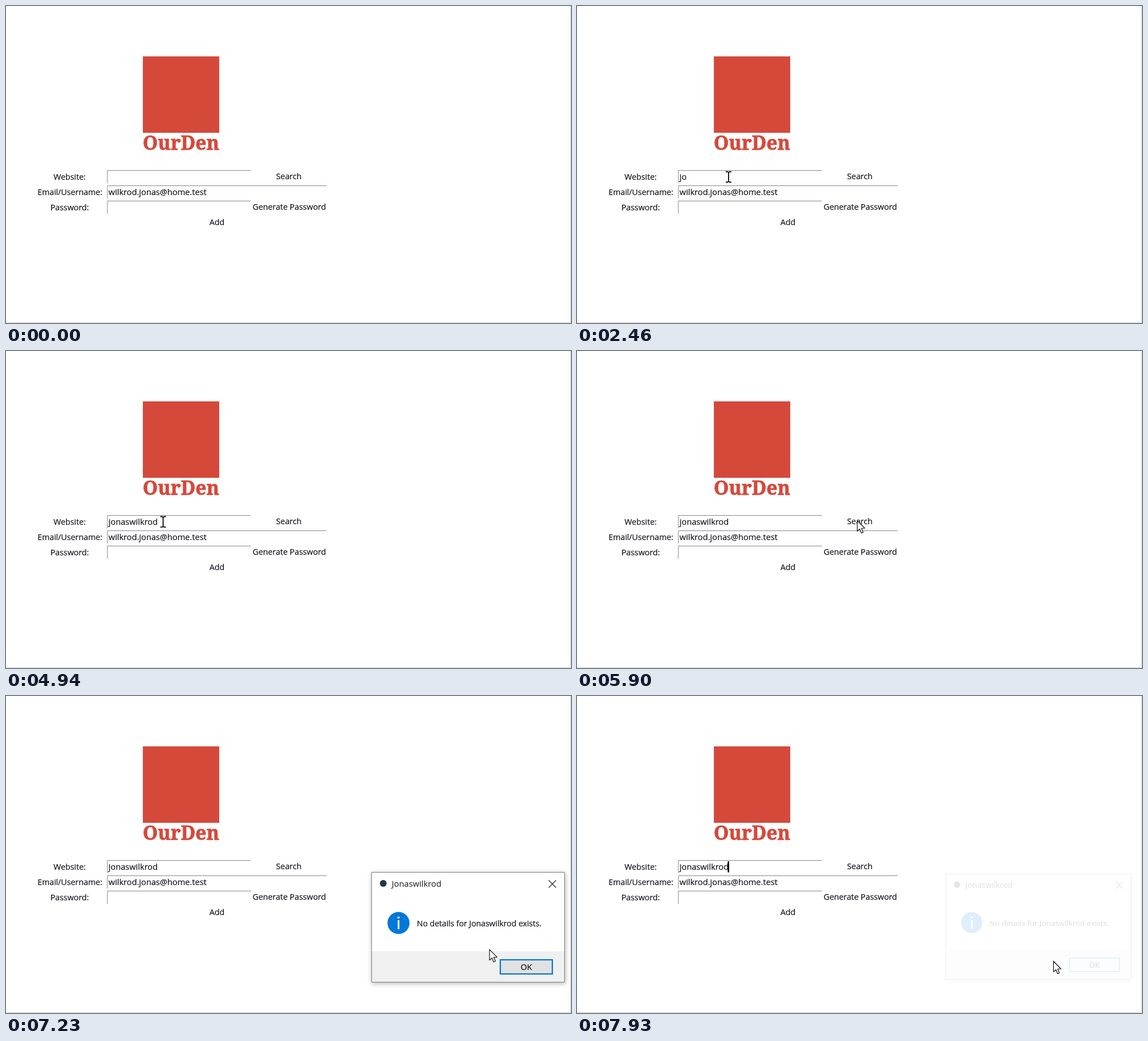
An HTML page for the animation above (8000 ms loop, 999 px wide and 560 px high).

```html
<!DOCTYPE html>
<html lang="en">
<head>
<meta charset="utf-8">
<title>Password manager</title>
<style>
  html, body { margin: 0; width: 100%; height: 100%; overflow: hidden; background: #fff; }
  svg { display: block; width: 999px; height: 560px; }
  text {
    font: 14.3px "Open Sans", "Noto Sans", sans-serif;
    fill: #14141c; stroke: #14141c; stroke-width: .2; white-space: pre;
  }
  .mid { text-anchor: middle; }
  .entry { font-size: 14.7px; }
  .brand { font: 900 34px "Noto Serif", serif; fill: #d5493b; stroke: #d5493b; stroke-width: .8; }
  .title { font-size: 14.8px; stroke: none; }
  .message { font-size: 14.1px; }
  .edge { fill: none; stroke: #868686; }
  .shadow { filter: drop-shadow(1px 2px 4px rgba(0, 0, 0, .3)); }
</style>
</head>
<body>
<svg viewBox="0 0 999 560">
  <path d="M998.5 0V559.5H0" fill="none" stroke="#cbcbcb"/>

  <rect x="242" y="89" width="135" height="135" fill="#d5493b"/>
  <text class="brand mid" x="309.5" y="254">OurDen</text>

  <text class="mid" x="112.5" y="307">Website:</text>
  <text class="mid" x="113" y="334">Email/Username:</text>
  <text class="mid" x="112.5" y="361">Password:</text>
  <text class="mid" x="500" y="306">Search</text>
  <text class="mid" x="501" y="360">Generate Password</text>
  <text class="mid" x="373" y="386.5">Add</text>

  <path class="edge" d="M179.2 313V290.5H433M179.2 340V317.5H567M179.2 367V344.5H433"/>
  <text class="entry" id="site" x="181.3" y="307.3"></text>
  <text class="entry" x="181.3" y="334.3">wilkrod.jonas@home.test</text>
  <rect id="caret" y="292" width="2.6" height="19.5" fill="#000"/>

  <g id="dialog">
    <rect class="shadow" x="646.5" y="311.5" width="341" height="194" fill="#fff" stroke="#7d7d7d"/>
    <rect x="647" y="451" width="340" height="54" fill="#f0f0f0"/>
    <circle cx="667" cy="331" r="6" fill="#22364f"/>
    <text class="title" x="682" y="337">Jonaswilkrod</text>
    <path d="M959.5 325.5l13 13m0 -13l-13 13" stroke="#222" stroke-width="1.2"/>
    <circle cx="694" cy="401" r="19.5" fill="#0078d7"/>
    <circle cx="694" cy="391.3" r="1.9" fill="#fff"/>
    <rect x="692.6" y="396" width="2.9" height="16" fill="#fff"/>
    <text class="message" x="726.5" y="407.3">No details for Jonaswilkrod exists.</text>
    <rect id="button" x="874" y="466" width="92" height="25"/>
    <text class="mid" x="920" y="484">OK</text>
  </g>

  <circle id="ring" r="15" fill="rgba(255,255,0,.47)"/>
  <path id="arrow" d="M.5 .5V19.3L4.8 15.4L7.8 22.6L10.9 21.2L7.9 14.3L13.8 14Z"
        fill="#fff" stroke="#111" stroke-width="1.2" stroke-linejoin="round"/>
  <path id="beam" d="M-5 -9.3H-2L0 -8L2 -9.3H5M0 -8V8M-5 9.3H-2L0 8L2 9.3H5"
        fill="none" stroke="#111" stroke-width="1.9"/>
</svg>
<script>
const LOOP = 8000, STEP = 66;
const NAME = "jonaswilkrod";
const KEYS = [2190, 2460, 2660, 2790, 2940, 3470, 3620, 3820, 3950, 4080, 4220, 4410];
const CLICKS = [1590, 5700, 7590];
// start, steps, destination
const MOVES = [
  [380, 3, 582, 457],
  [780, 3, 333, 353],
  [1180, 3, 268, 302],
  [4940, 8, 495, 299],
  [6690, 3, 834, 432],
  [7090, 7, 886, 471],
  [7860, 2, 842, 468],
];
// left, top, right, bottom
const ENTRIES = [[179, 290, 433, 313], [179, 317, 567, 340], [179, 344, 433, 367]];
const BUTTON = [873, 465, 967, 492];

const $ = id => document.getElementById(id);
const [site, caret, dialog, button, ring, arrow, beam] =
  ["site", "caret", "dialog", "button", "ring", "arrow", "beam"].map($);

const set = (el, attrs) => {
  for (const key in attrs) el.setAttribute(key, attrs[key]);
};
const show = (el, on) => set(el, { visibility: on ? "visible" : "hidden" });
const smooth = p => p * p * (3 - 2 * p);
const inside = ([x, y], [l, t, r, b]) => x >= l && x <= r && y >= t && y <= b;
const progress = (t, start, steps) =>
  t < start ? 0 : Math.min(1, (Math.floor((t - start) / STEP) + 1) / steps);

function pointer(t) {
  let x = 747, y = 553;
  for (const [start, steps, toX, toY] of MOVES) {
    const p = smooth(progress(t, start, steps));
    x += (toX - x) * p;
    y += (toY - y) * p;
  }
  return [x, y];
}

function drawPointer(t, pos) {
  const text = ENTRIES.some(box => inside(pos, box));
  const place = { transform: `translate(${pos[0]} ${pos[1]})` };
  [arrow, beam, ring].forEach(el => set(el, place));
  show(arrow, t >= 380 && !text);
  show(beam, t >= 380 && text);
  show(ring, CLICKS.some(c => t >= c && t < c + 200));
}

function drawEntry(t) {
  const typed = NAME.slice(0, KEYS.filter(k => t >= k).length);
  if (site.textContent !== typed) site.textContent = typed;
  const width = typed ? site.getComputedTextLength() : 0;
  set(caret, { x: 179.5 + width });
  const blink = t >= 1590 && t < 6040 && (t - 1570) % 900 < 600;
  show(caret, blink || t >= 7400);
}

function drawDialog(t, pos) {
  const opening = progress(t, 5970, 4);
  const closing = progress(t, 7860, 2);
  const eased = 1 - (1 - opening) ** 2;
  const scale = 0.9 + 0.1 * eased - 0.04 * closing;
  show(dialog, t >= 5970);
  set(dialog, {
    opacity: eased * (1 - 0.88 * closing),
    transform: `translate(${817 - closing} ${408.5 - closing}) scale(${scale}) translate(-817 -408.5)`,
  });

  const pressed = t >= 7590 && t < 7860;
  const hot = t >= 7860 || inside(pos, BUTTON);
  set(button, {
    fill: pressed ? "#cce4f7" : hot ? "#e5f1fb" : "#e1e1e1",
    stroke: pressed ? "#2a6ca6" : "#0078d7",
    "stroke-width": hot ? 1.5 : 2.2,
  });
}

function frame(now) {
  const t = Math.max(0, now - begin) % LOOP;
  const pos = pointer(t);
  drawEntry(t);
  drawDialog(t, pos);
  drawPointer(t, pos);
  requestAnimationFrame(frame);
}

const begin = performance.now();
frame(begin);
</script>
</body>
</html>
```
